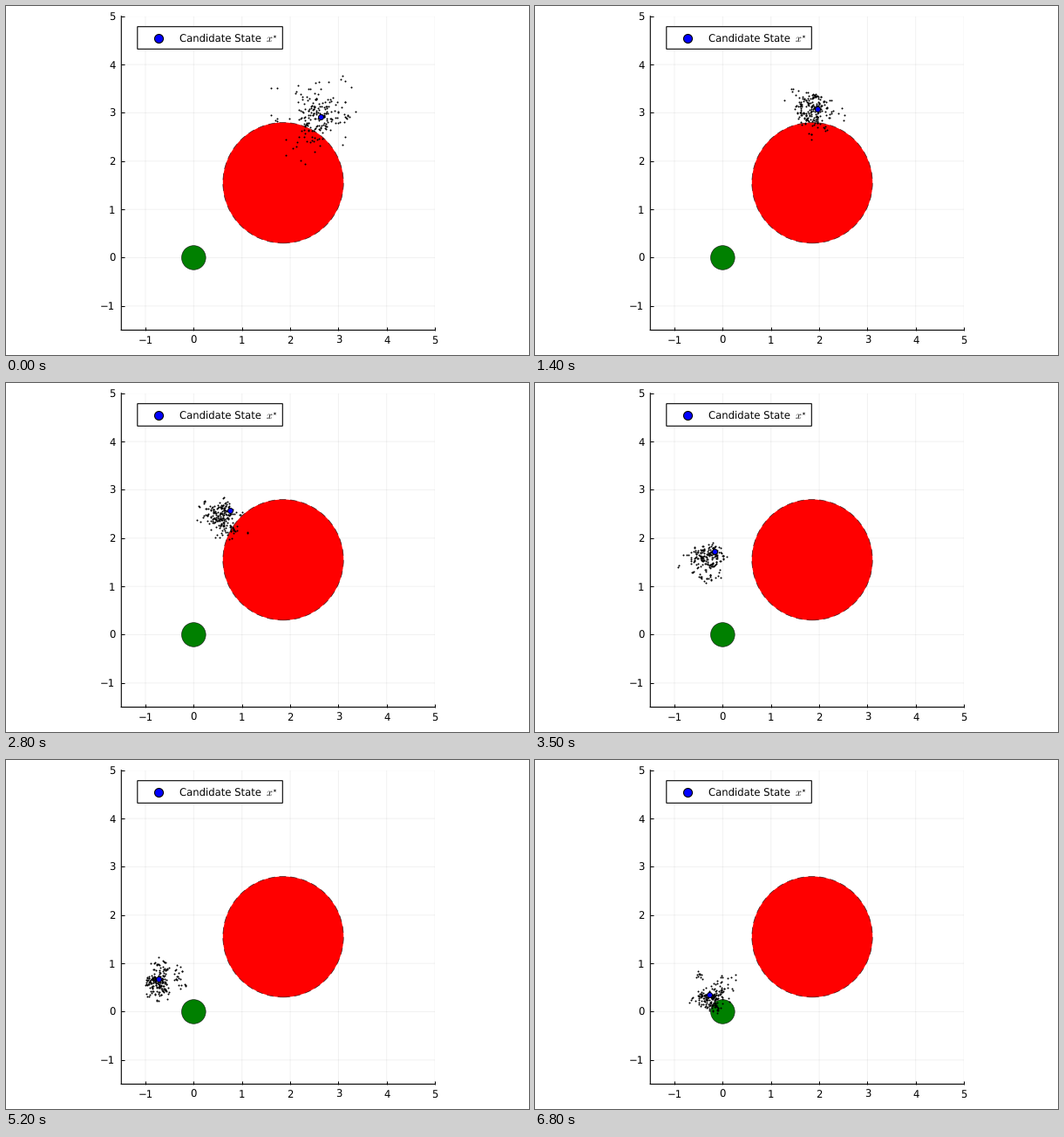
Recreate the animation shown at these times as a matplotlib script. Size 600 by 400 pixels, loop 6.9 s.

```python
import matplotlib.pyplot as plt
import numpy as np
from matplotlib.animation import FuncAnimation
from matplotlib.patches import Circle, Rectangle

W, H, DPI = 600, 400, 100
PX = 72 / DPI  # points per pixel
FRAMES, STEP = 69, 100
COUNT = 200

plt.rcParams.update({
    "font.family": "DejaVu Sans",
    "font.size": 8.4,
    "text.hinting": "no_hinting",
})

# Way round the obstacle to the goal, as x + iy at a few steps
KEY_STEPS = np.array([0, 14, 28, 35, 44, 59, 68])
KEY_POINTS = np.array([2.63 + 2.92j, 1.96 + 3.08j, 0.75 + 2.58j,
                       -0.17 + 1.73j, -0.73 + 1.03j, -0.54 + 0.51j,
                       -0.28 + 0.35j])


def smooth(t, ts, ps):
    """Cubic Hermite curve through the key points."""
    slopes = np.gradient(ps, ts)
    i = np.clip(np.searchsorted(ts, t, side="right") - 1, 0, len(ts) - 2)
    h = ts[i + 1] - ts[i]
    s = (t - ts[i]) / h
    start = (1 - s) ** 2 * ((1 + 2 * s) * ps[i] + s * h * slopes[i])
    end = s * s * ((3 - 2 * s) * ps[i + 1] + (s - 1) * h * slopes[i + 1])
    return start + end


def simulate(path, seed=4):
    """Particle cloud that runs a little ahead of the path and tightens."""
    rng = np.random.default_rng(seed)
    centers = path + 1.5 * np.gradient(path)
    z = rng.normal(size=(COUNT, 2))
    clouds = []
    for i, c in enumerate(centers):
        z = z[rng.integers(COUNT, size=COUNT)]
        z = z + rng.normal(scale=0.22, size=z.shape)
        z = (z - z.mean(axis=0)) / z.std(axis=0)
        spread = 0.18 + 0.14 * np.exp(-i / 8)
        clouds.append((c.real + spread * z[:, 0], c.imag + spread * z[:, 1]))
    return clouds


path = smooth(np.arange(FRAMES), KEY_STEPS, KEY_POINTS)
clouds = simulate(path)

fig = plt.figure(figsize=(W / DPI, H / DPI), dpi=DPI, facecolor="white")
ax = fig.add_axes([132.3 / W, 1 - 371.5 / H, 359.8 / W, 359.8 / H])
ax.set(xlim=(-1.5, 5), ylim=(-1.5, 5),
       xticks=range(-1, 6), yticks=range(-1, 6))
ax.spines[["top", "right"]].set_visible(False)
for side in ("left", "bottom"):
    ax.spines[side].set(linewidth=1.1 * PX, snap=False)
ax.tick_params(direction="in", length=4 * PX, width=PX)
ax.tick_params(axis="x", pad=4.4)
ax.tick_params(axis="y", pad=5)
ax.grid(color="black", alpha=0.055, linewidth=PX, snap=False)
ax.set_axisbelow(True)

rim = dict(ec=(0, 0, 0, 0.75), lw=0.7 * PX, zorder=2)
ax.add_patch(Circle((1.855, 1.55), 1.25, fc="red", ls=(0, (11, 7)), **rim))
ax.add_patch(Circle((0, 0), 0.25, fc="green", **rim))

blue = dict(marker="o", ls="none", mfc="blue", mec="black", snap=False)
dots, = ax.plot([], [], "o", color="black", ms=2 * PX, mew=0, snap=False,
                zorder=4)
state, = ax.plot([], [], ms=6 * PX, mew=PX, zorder=5, **blue)


def at(x, y):
    """Stage pixels to figure fractions."""
    return x / W, 1 - y / H


over = dict(transform=fig.transFigure, zorder=8)
ax.add_patch(Rectangle(at(150.8, 49.3), 166.5 / W, 25.6 / H, fc="white",
                       ec="black", lw=1.1 * PX, snap=False, **over))
mx, my = at(175.2, 36.6)
ax.plot([mx], [my], ms=10 * PX, mew=0.8, **blue, **over)
ax.text(*at(198.7, 40.8), "Candidate State", **over)
ax.text(*at(298.5, 40.8), "$x$", fontsize=8.8, math_fontfamily="cm", **over)
ax.text(*at(308.8, 35), r"$\star$", fontsize=5, math_fontfamily="cm",
        ha="center", va="center", **over)


def update(i):
    dots.set_data(*clouds[i])
    state.set_data([path[i].real], [path[i].imag])
    return dots, state


anim = FuncAnimation(fig, update, frames=FRAMES, interval=STEP,
                     repeat=True, repeat_delay=0, blit=False)
plt.show()
```
